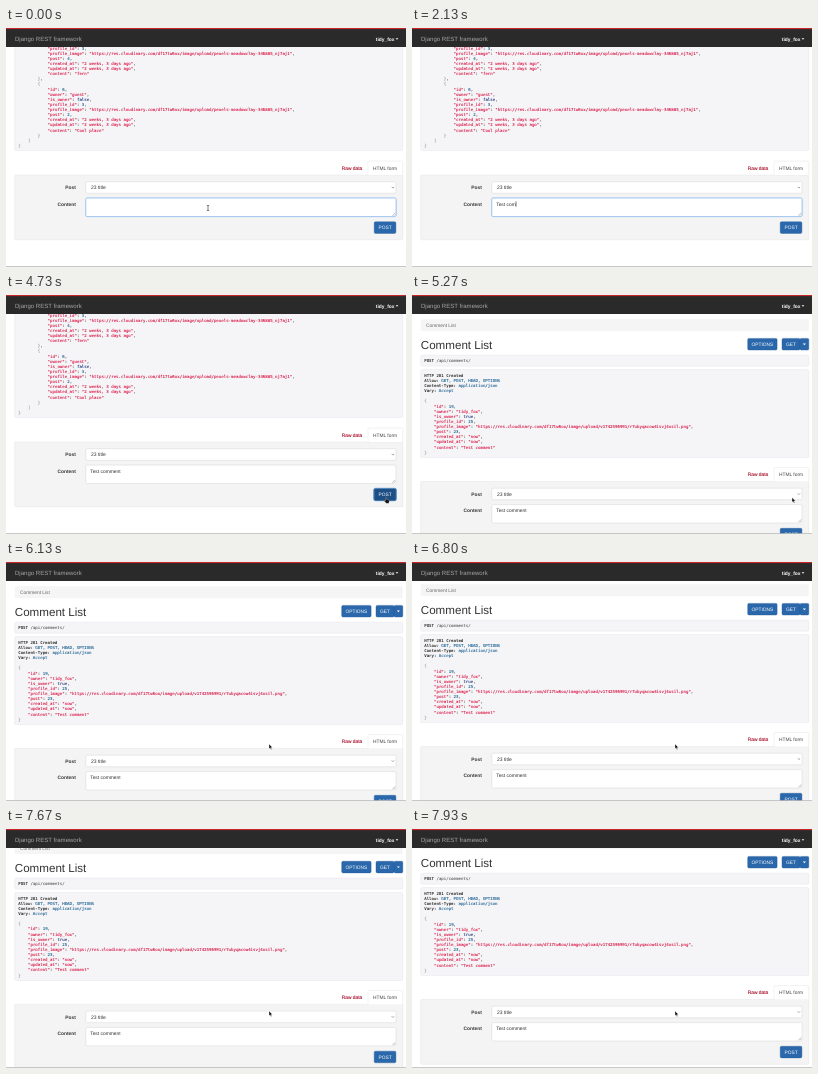
An HTML page for the animation above (8000 ms loop, 400 by 239 pixels).

```html
<!DOCTYPE html>
<html lang="en">
<head>
<meta charset="utf-8">
<title>Comment form</title>
<style>
  html, body { margin: 0; width: 100%; height: 100%; overflow: hidden; background: #fff; }
  svg { display: block; width: 100vw; height: 100vh; }
  text {
    white-space: pre; font: 4.85px "Liberation Sans", Arial, sans-serif;
    fill: #333; text-rendering: geometricPrecision;
  }
  .mono { font: 4.07px "DejaVu Sans Mono", monospace; }
  .bold { font-weight: bold; }
  .light { fill: #fff; }
</style>
</head>
<body>
<svg id="stage" viewBox="0 0 400 239" preserveAspectRatio="none"></svg>
<script>
const LOOP = 8000, SUBMIT = 5000, LINE = 5.125, CHAR = 2.45, LEFT = 12.2;
const BLUE = '#2a68ab';
const stage = document.getElementById('stage');

function add(parent, tag, attrs, content) {
  const el = document.createElementNS('http://www.w3.org/2000/svg', tag);
  for (const k in attrs) el.setAttribute(k, attrs[k]);
  if (content !== undefined) el.textContent = content;
  parent.appendChild(el);
  return el;
}
const group = parent => add(parent, 'g', {});
const label = (g, x, y, str, attrs = {}) => add(g, 'text', { x, y, ...attrs }, str);
const box = (g, x, y, width, height, fill, stroke = 'none', rx = 1.3) =>
  add(g, 'rect', { x, y, width, height, fill, stroke, rx, 'stroke-width': 0.4 });
const shape = (g, d, attrs) => add(g, 'path', { d, ...attrs });
const span = (text, fill, str) => add(text, 'tspan', { fill, stroke: fill, 'stroke-width': 0.1 }, str);

// Strings, numbers, keywords, separators, brackets
const TOKEN = /("[^"]*")|(\d+)|(true|false)|([,: ]+)|([{}[\]]+)/g;
const COLORS = ['#d81040', '#195f91', '#1e347b', '#555', '#93a1a1'];

// One JSON line; leading spaces become an offset
function jsonLine(g, y, line) {
  const body = line.trimStart();
  const text = label(g, LEFT + (line.length - body.length) * CHAR, y, undefined, { class: 'mono' });
  for (const m of body.matchAll(TOKEN))
    span(text, COLORS[m.slice(1).findIndex(Boolean)], m[0]);
}
function json(g, y, lines) {
  lines.forEach((line, i) => jsonLine(g, y + i * LINE, line));
}
function headerLine(g, y, name, value) {
  const text = label(g, LEFT, y, undefined, { class: 'mono' });
  add(text, 'tspan', { class: 'bold' }, name);
  span(text, '#195f91', value);
}
function button(g, x, y, w, str) {
  const rect = box(g, x, y, w, 11.6, BLUE, '#245b98');
  label(g, x + w / 2, y + 7.5, str, { class: 'light', 'text-anchor': 'middle' });
  return rect;
}

// Comment list, scrolled to its end
const MEDIA = '"profile_image": "https://res.cloudinary.com/df17tw6ox/image/upload/';
const listPage = group(stage);
box(listPage, 8.8, 0, 388, 122.6, '#f5f5f7', '#e1e1e8');
const comment = (post, content) => [
  '"profile_id": 3,', MEDIA + 'pexels-meadowclay-346885_nj7aj1",', `"post": ${post},`,
  '"created_at": "2 weeks, 3 days ago",', '"updated_at": "2 weeks, 3 days ago",',
  `"content": "${content}"`
].map(s => ' '.repeat(12) + s);
json(listPage, 21.5, [
  ...comment(4, 'fern'), '        },', '        {',
  ...['"id": 6,', '"owner": "guest",', '"is_owner": false,'].map(s => ' '.repeat(12) + s),
  ...comment(2, 'Cool place'), '        }', '    ]', '}'
]);

// Created comment
const resultPage = group(stage);
box(resultPage, 8.8, 24.3, 388, 11.9, '#f5f5f5');
label(resultPage, 14, 32, 'Comment List', { style: 'fill:#666' });
label(resultPage, 8.8, 54, 'Comment List', { style: 'font-size:11.6px' });
button(resultPage, 335.7, 43.4, 29.4, 'OPTIONS');
button(resultPage, 370, 43.4, 18, 'GET');
button(resultPage, 388, 43.4, 8.8, '');
shape(resultPage, 'M390.9 48.6h3l-1.5 1.6z', { fill: '#fff' });
box(resultPage, 8.8, 60.2, 388, 11, '#f5f5f7', '#e1e1e8');
const request = label(resultPage, LEFT, 67, undefined, { class: 'mono' });
add(request, 'tspan', { class: 'bold' }, 'POST');
add(request, 'tspan', {}, ' /api/comments/');
box(resultPage, 8.8, 74.6, 388, 88, '#f5f5f7', '#e1e1e8');
[['HTTP 201 Created', ''], ['Allow:', ' GET, POST, HEAD, OPTIONS'],
 ['Content-Type:', ' application/json'], ['Vary:', ' Accept']]
  .forEach(([name, value], i) => headerLine(resultPage, 81.8 + i * LINE, name, value));
json(resultPage, 81.8 + 5 * LINE, [
  '{', '    "id": 19,', '    "owner": "tidy_fox",', '    "is_owner": true,', '    "profile_id": 25,',
  '    ' + MEDIA + 'v1742596991/r7ubyqacow4isvj4xsil.png",', '    "post": 23,',
  '    "created_at": "now",', '    "updated_at": "now",', '    "content": "Test comment"', '}'
]);

// Form shared by both pages
const form = group(stage);
label(form, 335.8, 141.8, 'Raw data', { style: 'fill:#a8102c', stroke: '#a8102c', 'stroke-width': 0.12 });
box(form, 8.8, 147, 388, 64.8, '#f4f4f4', '#ddd', 0.8);
shape(form, 'M362 147.1v-13q0-1 1-1h32.8q1 0 1 1v13', { fill: '#fff', stroke: '#ddd', 'stroke-width': 0.4 });
label(form, 367, 141.8, 'HTML form', { style: 'fill:#444' });
label(form, 69.8, 161.2, 'Post', { class: 'bold', 'text-anchor': 'end' });
label(form, 69.8, 177.8, 'Content', { class: 'bold', 'text-anchor': 'end' });
box(form, 79.8, 153.7, 310.2, 11.6, '#fff', '#ccc');
label(form, 85, 161.3, '23 title', { style: 'fill:#333;font-size:5px' });
shape(form, 'M385.7 158.9l1.2 1.2l1.2-1.2', { fill: 'none', stroke: '#444', 'stroke-width': 0.5 });
const glow = box(form, 79.5, 169.8, 310.8, 19, 'none', '#c9def5', 1.8);
glow.setAttribute('stroke-width', 1);
const area = box(form, 79.8, 170.1, 310.2, 18.4, '#fff', '#ccc');
shape(form, 'M386.4 187.7l2.8-2.8M388 187.7l1.2-1.2', { stroke: '#666', 'stroke-width': 0.4 });
const typed = label(form, 84.2, 177.8, '', { style: 'font-size:4.9px;fill:#333' });
const caret = add(form, 'rect', { y: 173.2, width: 0.5, height: 5.6, fill: '#111' });
const ring = box(form, 367.7, 193.3, 22.7, 12.4, 'none', '#6aa0d6', 1.6);
ring.setAttribute('stroke-width', 1);
const post = button(form, 368.2, 193.8, 21.7, 'POST');

// Fixed chrome
box(stage, 0, 0, 400, 19, '#2a2a2a', 'none', 0);
box(stage, 0, 0, 400, 1.1, '#c4262a', 'none', 0);
label(stage, 9, 13, 'Django REST framework', { style: 'font-size:6.06px;fill:#a5a5a5' });
label(stage, 369.8, 12.5, 'tidy_fox', { class: 'bold light', style: 'font-size:4.9px' });
shape(stage, 'M389.6 10.2h2.8l-1.4 1.6z', { fill: '#fff' });
box(stage, 0, 238.2, 400, 0.8, '#bbb', 'none', 0);

const pointers = {
  beam: shape(stage, 'M-1.2-2.6q1.2 0 1.2.7q0-.7 1.2-.7M0-1.9v3.8M-1.2 2.6q1.2 0 1.2-.7q0 .7 1.2.7',
    { fill: 'none', stroke: '#222', 'stroke-width': 0.6 }),
  arrow: shape(stage, 'M0 0v4.8l1.1-1l.8 1.8l.9-.4l-.8-1.7h1.5z',
    { fill: '#111', stroke: '#fff', 'stroke-width': 0.35 }),
  hand: shape(stage, 'M-.4 0q.5-.6 1 0v2l2.2.6q.6.2.5 1l-.5 2.2h-2.6l-1.9-2.4q0-.8.8-.5l.5.4z',
    { fill: '#111', stroke: '#ddd', 'stroke-width': 0.3 })
};

const KEYS = [470, 1270, 1470, 1600, 1730, 1930, 2000, 2130, 2270, 2400, 2470, 2600];
const MESSAGE = 'Test comment';
const CLICK = 4530;
const SCROLL = [[6530, 0], [6800, 2], [7400, 6], [7930, 16]];
const PATH = [[3470, 202, 180], [3800, 386, 211], [4000, 386, 211], [4300, 380, 202.5],
              [5730, 380, 202.5], [6130, 263, 182]];

function track(points, t, col) {
  const next = points.findIndex(p => p[0] > t);
  if (next === 0) return points[0][col];
  if (next < 0) return points[points.length - 1][col];
  const a = points[next - 1], b = points[next];
  return a[col] + (b[col] - a[col]) * (t - a[0]) / (b[0] - a[0]);
}
const show = (el, on) => el.setAttribute('visibility', on ? 'visible' : 'hidden');
const move = (el, x, y) => el.setAttribute('transform', `translate(${x} ${y})`);

function caretOn(t) {
  if (t < 470 || t >= CLICK) return false;
  if (t < 1270) return t < 1000;
  return t < 2600 || Math.floor((t - 2600) / 500) % 2 === 0;
}

function draw(t) {
  const done = t >= SUBMIT, scroll = track(SCROLL, t, 1);
  show(listPage, !done);
  show(resultPage, done);
  move(resultPage, 0, -scroll);
  move(form, 0, done ? 39.5 - scroll : 0);

  const count = KEYS.filter(k => k <= t).length;
  typed.textContent = MESSAGE.slice(0, count);
  const width = count ? typed.getSubStringLength(0, count) : 0;
  caret.setAttribute('x', 84.2 + width);
  show(caret, caretOn(t));

  const focus = t < CLICK, pressed = !focus && !done;
  area.setAttribute('stroke', focus ? '#7fb0e6' : '#ccc');
  area.setAttribute('stroke-width', focus ? 0.6 : 0.4);
  show(glow, focus);
  show(ring, pressed);

  const x = track(PATH, t, 1), y = track(PATH, t, 2);
  const over = !done && x > 368 && x < 390 && y > 193.8 && y < 205.4;
  post.setAttribute('fill', pressed ? '#1d4f85' : over ? '#235a96' : BLUE);
  const kind = over ? 'hand' : !done && y < 188.5 ? 'beam' : 'arrow';
  for (const name in pointers) {
    show(pointers[name], name === kind && (t < 130 || t >= 3070));
    move(pointers[name], x, y);
  }
}

const start = performance.now();
function tick() {
  draw((performance.now() - start) % LOOP);
  requestAnimationFrame(tick);
}
tick();
</script>
</body>
</html>
```
